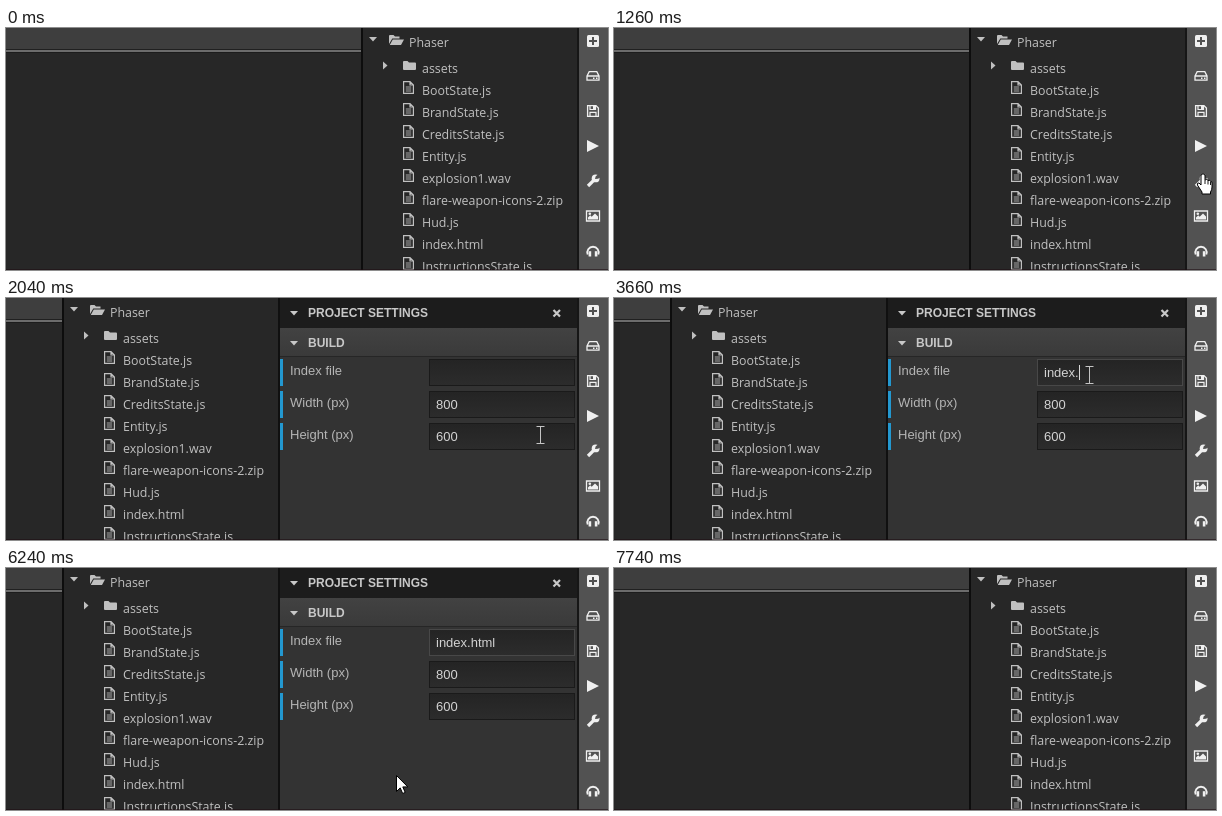
An HTML page with a canvas for the animation above (8.76 s loop, 602 by 242 pixels).

```html
<!DOCTYPE html>
<html lang="en">
<head>
<meta charset="utf-8">
<title>Project settings</title>
<style>
html, body { margin: 0; width: 100%; height: 100%; overflow: hidden; background: #272727; }
canvas { display: block; }
</style>
</head>
<body>
<canvas id="stage" width="602" height="242"></canvas>
<script>
const ctx = document.getElementById('stage').getContext('2d');
const LOOP = 8760, STEP = 60, PANEL_W = 299, BAR_X = 572;
const FOCUS = 2400, BLUR = 7260, BLINK = 504;
const TREE_FONT = '12.4px "Open Sans", "Noto Sans", sans-serif';
const FORM_FONT = '13px "Liberation Sans", Arial, sans-serif';
const HEAD_FONT = 'bold 12px "Liberation Sans", Arial, sans-serif';
const TREE_INK = '#c0c0c0', HEAD_INK = '#c8c8c8';
const FILES = ['BootState.js', 'BrandState.js', 'CreditsState.js', 'Entity.js', 'explosion1.wav',
  'flare-weapon-icons-2.zip', 'Hud.js', 'index.html', 'InstructionsState.js'];
const LABELS = ['Index file', 'Width (px)', 'Height (px)'];
const fieldTop = i => 61 + 32 * i;

const BURSTS = [
  { start: 3120, gap: 80, text: 'inde' },
  { start: 3540, gap: 120, text: 'x.' },
  { start: 4320, gap: 60, text: 'html' }
];

// each pointer stroke is an eased Bezier curve; it rests between strokes
const STROKES = [
  { start: 180, end: 1260, curve: [[376, 52], [480, 273], [589, 146]] },
  { start: 1500, end: 2100, curve: [[589, 146], [560, 148], [533, 135]] },
  { start: 2040, end: 2400, curve: [[535, 137], [476, 77]] },
  { start: 4980, end: 5880, curve: [[476, 77], [486, 150], [620, 225], [523, 208]] },
  { start: 5880, end: 6840, curve: [[523, 208], [320, 214], [36, 174]] }
];

const ARROW = new Path2D('M.5 .5V16.5L4.2 12.9L6.7 18.5L9.2 17.4L6.8 11.9H11.8Z');
const HAND = new Path2D('M-2 1Q0 -1.5 2 1V6Q4 4.5 5 6.5Q7 5.5 7.6 7.5Q9 7 9 9V13Q9 16 7.5 18V20H-1V18L-5.6 11Q-6 8.5 -4 9L-2 11Z');

function rect(x, y, w, h, color) {
  ctx.fillStyle = color;
  ctx.fillRect(x, y, w, h);
}

function shade(x, y, w, h, top, bottom) {
  const fill = ctx.createLinearGradient(0, y, 0, y + h);
  fill.addColorStop(0, top);
  fill.addColorStop(1, bottom);
  rect(x, y, w, h, fill);
}

function text(str, x, y, font, color) {
  ctx.font = font;
  ctx.fillStyle = color;
  ctx.fillText(str, x, y);
}

function shape(d, color, width) {
  const path = new Path2D(d);
  if (width) {
    ctx.strokeStyle = color;
    ctx.lineWidth = width;
    ctx.stroke(path);
  } else {
    ctx.fillStyle = color;
    ctx.fill(path);
  }
}

function dot(x, y, r, color) {
  ctx.fillStyle = color;
  ctx.beginPath();
  ctx.arc(x, y, r, 0, 7);
  ctx.fill();
}

function at(x, y, draw) {
  ctx.save();
  ctx.translate(x, y);
  draw();
  ctx.restore();
}

const progress = (t, start, end) => Math.min(1, Math.max(0, (t - start) / (end - start)));
const swing = (t, start, end) => 0.5 - Math.cos(progress(t, start, end) * Math.PI) / 2;

function bezier(points, p) {
  if (points.length === 1) return points[0];
  const inner = points.slice(1).map((q, i) => q.map((v, k) => points[i][k] + (v - points[i][k]) * p));
  return bezier(inner, p);
}

function typing(t) {
  let typed = '', lastKey = FOCUS;
  for (const { start, gap, text } of BURSTS) {
    if (t < start) break;
    const count = Math.min(text.length, Math.floor((t - start) / gap) + 1);
    typed += text.slice(0, count);
    lastKey = start + (count - 1) * gap;
  }
  return { typed, caret: Math.floor((t - lastKey) / BLINK) % 2 === 0 };
}

function drawEditor(edge) {
  rect(0, 0, edge, 242, '#272727');
  rect(0, 0, edge, 21, '#3e3e3e');
  rect(0, 21, edge, 1, '#202020');
  rect(0, 22, edge, 2, '#6c6c6c');
  rect(0, 24, edge, 1, '#1c1c1c');
}

function drawFileIcon() {
  shape('M.6 .6H7L10.4 4V12.4H.6Z M7 .6V4H10.4', TREE_INK, 1.2);
  for (let y = 5.5; y < 10; y += 2) rect(2.8, y, 5.4, 1, '#a8a8a8');
}

function drawTree() {
  rect(-1, 0, 216, 242, '#272727');
  rect(-2, 0, 2, 242, '#0d0d0d');
  shape('M6 9H14L10 13.5Z', TREE_INK);
  shape('M26 16V8Q26 7 27 7H30.5L32 8.5H36.5V10.5H29.3Z M29.8 11.5H41L38 17H26.8Z', TREE_INK);
  text('Phaser', 46, 19, TREE_FONT, TREE_INK);
  shape('M20 33.5L24.5 37.5L20 41.5Z', TREE_INK);
  shape('M40 34Q40 33 41 33H44.5L46 34.5H52Q53 34.5 53 35.5V41Q53 42 52 42H41Q40 42 40 41Z', TREE_INK);
  text('assets', 59, 45, TREE_FONT, TREE_INK);
  FILES.forEach((name, i) => {
    const y = 53 + i * 22;
    at(40, y, drawFileIcon);
    text(name, 59, y + 14, TREE_FONT, TREE_INK);
  });
}

function drawField(label, y, value, focused) {
  rect(1, y, 3, 27, '#2398d0');
  text(label, 11, y + 16, FORM_FONT, '#b5b5b5');
  rect(150, y, 146, 27, focused ? '#484848' : '#1a1a1a');
  shade(151, y + 1, 144, 25, '#242424', '#2c2c2c');
  text(value, 157, y + 18, FORM_FONT, '#d2d2d2');
}

function drawHeading(label, y) {
  at(0, y, () => shape('M11 -2H19L15 2.5Z', HEAD_INK));
  text(label, 29, y + 4, HEAD_FONT, HEAD_INK);
}

function drawPanel(t) {
  rect(0, 0, PANEL_W, 242, '#333');
  rect(0, 0, PANEL_W, 30, '#1c1c1c');
  shade(0, 30, PANEL_W, 28, '#424242', '#3a3a3a');
  rect(0, 58, PANEL_W, 1, '#262626');
  rect(-1, 0, 2, 242, '#101010');
  drawHeading('PROJECT SETTINGS', 15);
  drawHeading('BUILD', 45);
  shape('M274.5 12L281 18.5M281 12L274.5 18.5', HEAD_INK, 2.2);

  const { typed, caret } = typing(t);
  const focused = t >= FOCUS && t < BLUR;
  const values = [typed, '800', '600'];
  LABELS.forEach((label, i) => drawField(label, fieldTop(i), values[i], focused && i === 0));
  if (focused && caret) {
    ctx.font = FORM_FONT;
    rect(157 + Math.round(ctx.measureText(typed).width), 67, 1, 15, '#d8d8d8');
  }
}

const INK = '#f0f0f0', BAR = '#525252';
const ICONS = [
  function add() {
    shape('M-4.5 -6H4.5Q6 -6 6 -4.5V4.5Q6 6 4.5 6H-4.5Q-6 6 -6 4.5V-4.5Q-6 -6 -4.5 -6Z', INK);
    shape('M-4 0H4M0 -4V4', BAR, 2);
  },
  function drive() {
    shape('M-6 0L-3.8 -4.3H3.8L6 0V4.2H-6ZM-6 0H6', INK, 1.3);
    rect(0, 1.5, 1.5, 1.5, INK);
    rect(3, 1.5, 1.5, 1.5, INK);
  },
  function save() {
    shape('M-5.4 -5.4H3L5.4 -3V5.4H-5.4Z', INK, 1.3);
    shape('M-3 -5V-1.5H2.5V-5M-3 5V1.3H3V5', INK, 1.2);
    rect(0, -5, 2, 3, INK);
  },
  function play() {
    shape('M-6 -6L6 0L-6 6Z', INK);
  },
  function wrench() {
    shape('M-5 5L1.2 -1.2', INK, 3.2);
    dot(2.6, -2.6, 3.9, INK);
    shape('M2 -2L2.6 -4.4L5.4 -7L8 -4L5 -2.3Z', BAR);
  },
  function picture() {
    shape('M-6.5 -5H6.5V5H-6.5Z', INK, 1.3);
    shape('M-5 3.5V1.5L-2.8 -.7L-1.3 .8L2 -2.5L5 .5V3.5Z', INK);
    dot(-3.2, -2.3, 1.3, INK);
  },
  function headphones() {
    shape('M-5.3 3.5A5.7 5.7 0 1 1 5.3 3.5', INK, 1.9);
    rect(-4.4, .2, 2.6, 5.3, INK);
    rect(1.8, .2, 2.6, 5.3, INK);
  }
];

function drawToolbar() {
  rect(BAR_X, 0, 30, 242, BAR);
  rect(BAR_X - 1, 0, 2, 242, '#161616');
  ICONS.forEach((draw, i) => at(587, 13 + 35 * i, draw));
}

function drawPointer(t, open) {
  const { start, end, curve } = STROKES.filter(s => t >= s.start).pop();
  const [x, y] = bezier(curve, swing(t, start, end)).map(Math.round);
  const overField = open === 1 && x >= 424 && x < 568 &&
    LABELS.some((_, i) => y >= fieldTop(i) && y < fieldTop(i) + 23);
  if (overField) {
    at(x - 0.5, y, () => shape('M-4 -8.5H4M0 -8V8M-4 8.5H4', '#c4c4c4', 1));
    return;
  }
  at(x, y, () => {
    const outline = x >= 582 ? HAND : ARROW;
    ctx.fillStyle = '#fff';
    ctx.strokeStyle = '#000';
    ctx.lineWidth = 1;
    ctx.fill(outline);
    ctx.stroke(outline);
    if (outline === HAND) shape('M2 6V10M5 7V10.5M7.5 8V11', '#000', 0.9);
  });
}

function frame(now) {
  const t = Math.floor((now % LOOP) / STEP) * STEP;
  const open = swing(t, 1380, 1800) - swing(t, BLUR, 7740);
  const shift = Math.round(PANEL_W * open);
  drawEditor(355 - shift);
  at(357 - shift, 0, drawTree);
  if (shift) at(BAR_X - shift, 0, () => drawPanel(t));
  drawToolbar();
  rect(0, 241, 602, 1, 'rgba(30,12,18,.55)');
  if (t >= 240 && t < 7740) drawPointer(t, open);
}

const begin = performance.now();
function tick() {
  frame(performance.now() - begin);
  requestAnimationFrame(tick);
}
tick();
</script>
</body>
</html>
```
